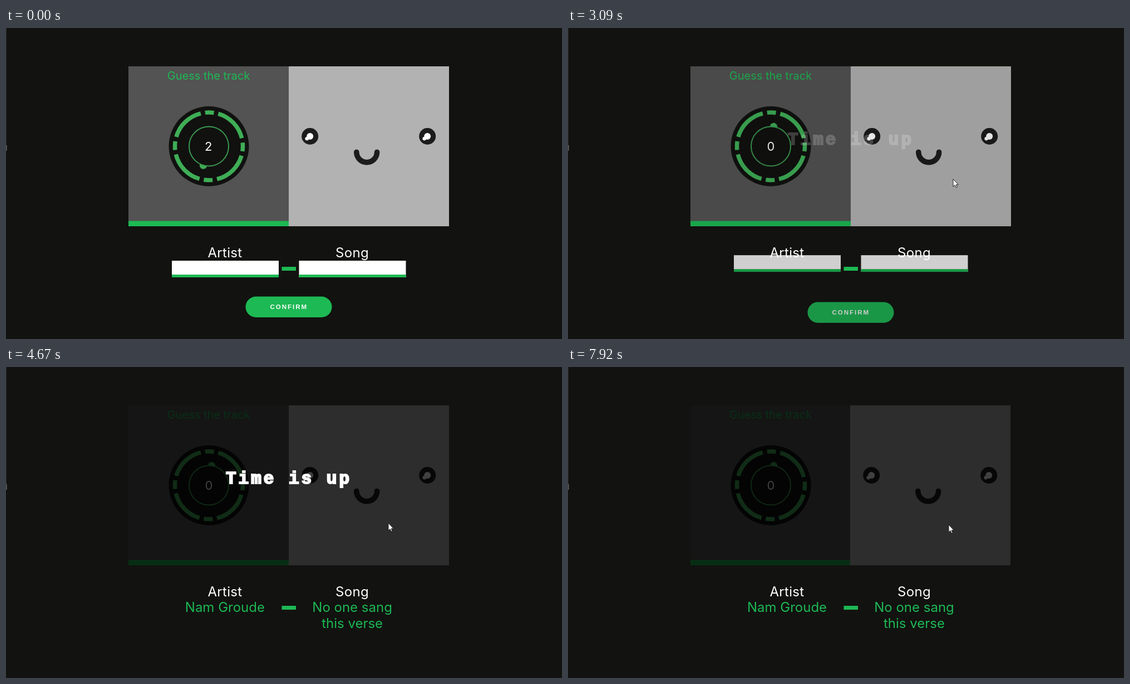
These frames come from a looping animation (999x560 px, 8 s). An HTML page:

```html
<!DOCTYPE html>
<html lang="en">
<head>
<meta charset="utf-8">
<title>Guess the track</title>
<style>
  html, body { margin: 0; width: 100%; height: 100%; overflow: hidden; background: #121210; }
  svg { display: block; width: 999px; height: 560px; }
  text { font-family: Inter, "Open Sans", sans-serif; font-size: 24px; fill: #fff; }
  .mid { text-anchor: middle; }
  .green { fill: #1db954; }
  .prompt { font-size: 20px; }
  .label { letter-spacing: .3px; }
  .digit { font-size: 22px; }
  .title { font: bold 31px "Liberation Mono", monospace; letter-spacing: 4px; stroke: #fff; stroke-width: 2.2; }
  .confirm { font: bold 11.5px "Liberation Sans", sans-serif; letter-spacing: 2px; }
  #dot { transform-origin: 364.5px 213px; }
</style>
</head>
<body>
<svg viewBox="0 0 999 560">
  <path d="M0 0h1v211h-1z" fill="#2b2b2a"/>
  <path d="M0 211h1.5v10h-1.5z" fill="#666"/>

  <g id="player">
    <rect x="220" y="69" width="288" height="288" fill="#535353"/>
    <rect class="green" x="220" y="347.5" width="288" height="9.5"/>
    <text class="mid prompt green" x="364" y="92.5">Guess the track</text>
    <circle cx="364.5" cy="213" r="72" fill="#111110"/>
    <circle cx="364.5" cy="213" r="61" fill="none" stroke="#3fae56" stroke-width="7.5"
      pathLength="360" stroke-dasharray="15 7.5 60 7.5" stroke-dashoffset="6.4"/>
    <circle id="dot" cx="364.5" cy="177" r="6.5" fill="#3fae56"/>
    <circle cx="364.5" cy="213" r="35.5" fill="#111110" stroke="#3a9a4f" stroke-width="2"/>
    <text class="digit" id="two" x="357" y="220.5">2</text>
    <text class="digit" id="one" x="357" y="220.5">1</text>
    <text class="digit" id="zero" x="357.5" y="220.5">0</text>
    <rect class="shade" x="220" y="69" width="288" height="288"/>
  </g>

  <g id="cover">
    <rect x="508" y="69" width="288" height="288" fill="#b2b2b2"/>
    <g id="eye">
      <circle cx="546.2" cy="195" r="15" fill="#1c1c1c"/>
      <circle cx="546.2" cy="195" r="6" fill="#fff"/>
      <circle cx="540.7" cy="199.3" r="3.3" fill="#fff"/>
    </g>
    <use href="#eye" x="211"/>
    <path d="M629.8 223.5a18.4 18.4 0 0 0 36.8 0" fill="none" stroke="#1c1c1c" stroke-width="9.6" stroke-linecap="round"/>
    <rect class="shade" x="508" y="69" width="288" height="288"/>
  </g>

  <text class="title" id="timeUp" x="395" y="210">Time is up</text>
  <text class="title" id="answerIs" x="361" y="214">The Answer is</text>

  <g id="fields">
    <path d="M298 419h192v30h-192zM526.5 419h192v30h-192z" fill="#fff"/>
    <path class="green" d="M298 444h192v5h-192zM526.5 444h192v5h-192z"/>
  </g>
  <g id="button">
    <rect class="green" x="430.5" y="483.5" width="155" height="37.5" rx="18.75"/>
    <text class="confirm" x="474.5" y="506.3">CONFIRM</text>
  </g>

  <text class="mid label" x="393.5" y="413">Artist</text>
  <text class="mid label" x="622" y="413">Song</text>
  <rect class="green" x="495.5" y="430" width="25.5" height="7"/>
  <text class="mid green" id="artist" x="393.5" y="440.5">Nam Groude</text>
  <g id="song">
    <text class="mid green" x="622" y="440.5">No one sang</text>
    <text class="mid green" x="622" y="469.5">this verse</text>
  </g>

  <path id="cursor" d="M0 0V13.5L3 10.7 5.2 15.3 7.2 14.4 5.1 10H9.3Z" fill="#fff" stroke="#111" stroke-width=".9"/>
</svg>
<script>
const LOOP = 8000;

// rows: [ms, style, easing towards the next row]
function play(selector, rows) {
  const first = rows[0], last = rows[rows.length - 1];
  const frames = [[0, first[1], 'linear'], ...rows, [LOOP, last[1]]]
    .map(([ms, style, easing = 'linear']) => ({ ...style, easing, offset: ms / LOOP }));
  document.querySelectorAll(selector).forEach(el =>
    el.animate(frames, { duration: LOOP, iterations: Infinity }));
}

const at = (x, y, opacity = 1) => ({ transform: `translate(${x}px, ${y}px)`, opacity });
const turn = deg => ({ transform: `rotate(${deg}deg)` });
const show = { opacity: 1 }, hide = { opacity: 0 };

// countdown
play('#dot', [[0, turn(196)], [2915, turn(728)]]);
play('#two', [[0, show, 'step-end'], [1900, hide]]);
play('#one', [[0, hide, 'step-end'], [1900, show, 'step-end'], [2915, hide]]);
play('#zero', [[0, hide, 'step-end'], [2915, show]]);

// time runs out
play('.shade', [[2900, hide, 'ease'], [4400, { opacity: .75 }]]);
play('#fields', [[2935, at(0, 0), 'ease'], [3935, at(0, -50, 0)]]);
play('#button', [[2935, at(0, 0), 'ease'], [3935, at(0, 50, 0)]]);
play('#timeUp', [
  [2935, at(0, 0, 0), 'ease'], [3935, at(0, 0)],
  [4930, at(0, 0), 'ease'], [5430, at(0, -120, 0)]]);

// answer
const slideIn = dx => [
  [0, at(dx, 0, 0), 'step-end'],
  [4050, at(dx * .7, 0, .28), 'cubic-bezier(.2,.6,.3,1)'],
  [4750, at(0, 0)]];
play('#artist', slideIn(-47));
play('#song', slideIn(48));
play('#answerIs', [
  [5990, at(0, 110, 0), 'ease'], [6450, at(0, 0)],
  [7400, at(0, 0), 'ease'], [7780, at(0, -122, 0)]]);
play('#cover', [[0, at(0, 0), 'step-end'], [7920, at(-1, 0)]]);

play('#cursor', [
  [0, at(886, 528, 0), 'step-end'], [250, at(886, 528), 'ease-out'], [850, at(692, 272)],
  [4200, at(692, 272), 'ease'], [4600, at(687, 281)],
  [7310, at(687, 281), 'step-end'], [7311, at(685.5, 282), 'step-end'], [7540, at(684, 284)]]);
</script>
</body>
</html>
```
